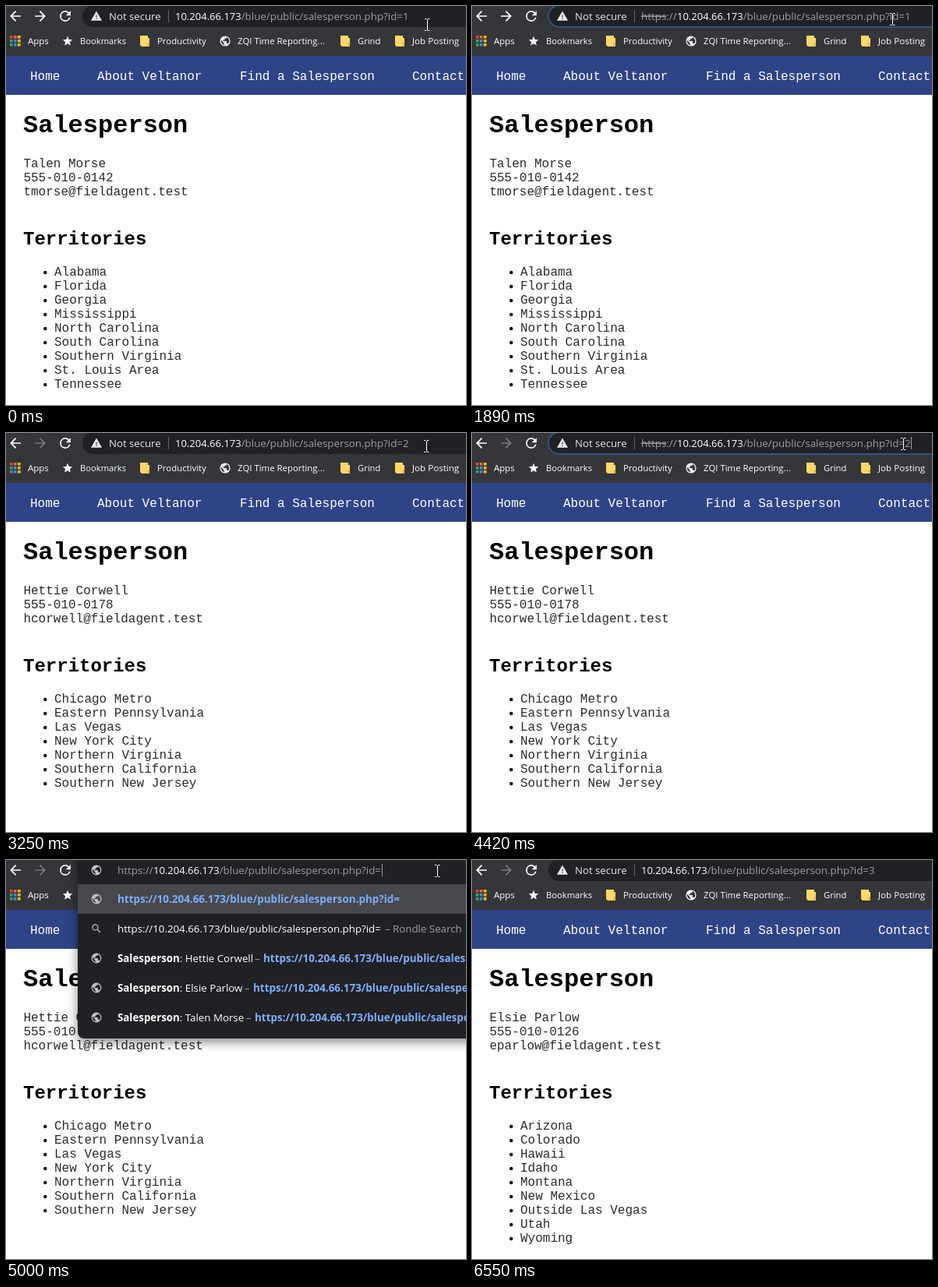
Recreate the animation shown at these times as an HTML page. Size 590 by 512 pixels, loop 7.23 s.

```html
<!DOCTYPE html>
<html lang="en">
<head>
<meta charset="utf-8">
<title>Salesperson pages</title>
<style>
  html, body { margin: 0; width: 100%; height: 100%; overflow: hidden; background: #fff; }
  svg { display: block; width: 590px; height: 512px; }
  .ui { font-family: "Open Sans", "Noto Sans", sans-serif; }
  .page { font-family: "Liberation Mono", "Courier New", monospace; font-size: 16px; fill: #2a2a2a; }
  .page .head { font-weight: 700; fill: #000; }
  .strike { text-decoration: line-through; }
  .drop { filter: drop-shadow(0 4px 7px rgba(0, 0, 0, .5)); }
  text { white-space: pre; }
</style>
</head>
<body>
<svg id="stage" viewBox="0 0 590 512"></svg>
<script>
const LOOP = 7230;
const HOST = "10.204.66.173";
const PATH = "/blue/public/salesperson.php?id=";
const BAR = "#35363a", FIELD = "#202124", WHITE = "#fff", GREY = "#9aa0a6", BLUE = "#7fadf8";

const people = [
  { name: "Talen Morse", phone: "555-010-0142", mail: "tmorse", linkX: 319,
    areas: "Alabama,Florida,Georgia,Mississippi,North Carolina,South Carolina,Southern Virginia,St. Louis Area,Tennessee" },
  { name: "Hettie Corwell", phone: "555-010-0178", mail: "hcorwell", linkX: 330,
    areas: "Chicago Metro,Eastern Pennsylvania,Las Vegas,New York City,Northern Virginia,Southern California,Southern New Jersey" },
  { name: "Elsie Parlow", phone: "555-010-0126", mail: "eparlow", linkX: 317,
    areas: "Arizona,Colorado,Hawaii,Idaho,Montana,New Mexico,Outside Las Vegas,Utah,Wyoming" }
];

// Each step changes part of the state at a given time.
const steps = [
  [0, { page: 0, bar: "idle", id: 1, caret: 0, pointer: "beam", x: 540, y: 24 }],
  [370, { y: 18 }],
  [520, { x: 539, y: 17 }],
  [830, { bar: "selected" }],
  [1360, { bar: "edit", caret: 1 }],
  [1890, { caret: 0 }],
  [2450, { bar: "typing", id: "", caret: 1 }],
  [2570, { id: 2 }],
  [2850, { bar: "loading" }],
  [3130, { bar: "idle", page: 1 }],
  [3780, { x: 553, y: 14 }],
  [4040, { bar: "selected" }],
  [4420, { bar: "edit" }],
  [4850, { bar: "typing", id: "" }],
  [5120, { id: 3 }],
  [5370, { bar: "loading" }],
  [5520, { bar: "idle", page: 2 }],
  [6020, { pointer: "arrow", x: 541, y: 250 }],
  [6140, { x: 525, y: 493 }],
  [6550, { pointer: "none" }]
];

const glyphs = {
  back: "M20 11H7.83l5.59-5.59L12 4l-8 8 8 8 1.41-1.41L7.83 13H20z",
  next: "M4 11h12.17l-5.59-5.59L12 4l8 8-8 8-1.41-1.41L16.17 13H4z",
  reload: "M17.65 6.35A7.96 7.96 0 0 0 12 4a8 8 0 1 0 7.73 10h-2.08A6 6 0 1 1 12 6c1.66 0 3.14.69 4.22 1.78L13 11h7V4z",
  stop: "M19 6.4L17.6 5 12 10.6 6.4 5 5 6.4 10.6 12 5 17.6 6.4 19 12 13.4 17.6 19 19 17.6 13.4 12z",
  warn: "M1 21h22L12 2zM13 18h-2v-2h2zM13 14h-2v-4h2z",
  star: "M12 17.27L18.18 21l-1.64-7.03L22 9.24l-7.19-.61L12 2 9.19 8.63 2 9.24l5.46 4.73L5.82 21z",
  search: "M15.5 14h-.79l-.28-.27A6.47 6.47 0 0 0 16 9.5 6.5 6.5 0 1 0 9.5 16c1.61 0 3.09-.59 4.23-1.57l.27.28v.79l5 4.99L20.49 19zm-6 0a4.5 4.5 0 1 1 0-9 4.5 4.5 0 0 1 0 9z",
  globe: "M12 2a10 10 0 1 0 0 20 10 10 0 0 0 0-20zm-1 17.93c-3.95-.49-7-3.85-7-7.93 0-.62.08-1.21.21-1.79L9 15v1c0 1.1.9 2 2 2zm6.9-2.54c-.26-.81-1-1.39-1.9-1.39h-1v-3c0-.55-.45-1-1-1H8v-2h2c.55 0 1-.45 1-1V7h2c1.1 0 2-.9 2-2v-.41c2.93 1.19 5 4.06 5 7.41 0 2.08-.8 3.97-2.1 5.39z"
};

const rect = (x, y, w, h, fill, more = "") =>
  `<rect x="${x}" y="${y}" width="${w}" height="${h}" fill="${fill}" ${more}/>`;
const text = (x, y, size, fill, str, more = "") =>
  `<text x="${x}" y="${y}" font-size="${size}" fill="${fill}" ${more}>${str}</text>`;
const icon = (name, cx, cy, scale, fill) =>
  `<path d="${glyphs[name]}" fill="${fill}" fill-rule="evenodd" transform="translate(${cx - 12 * scale} ${cy - 12 * scale}) scale(${scale})"/>`;
const bold = 'font-weight="700"';

function folder(x) {
  return `<path d="M${x} 38h10v3h2v11h-10l-2-2z" fill="#ffd868"/>` +
    `<path d="M${x + 9} 47h3v5h-3z" fill="#f2bf45"/>`;
}

function bookmarks() {
  const grid = ["#ea4335", "#f2673a", "#fbbc05", "#34a853", "#4285f4", "#fbbc05", "#34a853", "#4285f4", "#fbbc05"];
  const labels = [[28, 11.5, "Apps"], [95, 11.2, "Bookmarks"], [194, 11.4, "Productivity"],
    [297, 11.4, "ZQI Time Reporting..."], [451, 11.2, "Grind"], [521, 11.6, "Job Posting"]];
  return rect(0, 0, 590, 64, BAR) +
    grid.map((c, i) => rect(5 + i % 3 * 5, 38 + Math.floor(i / 3) * 5, 3.6, 3.6, c)).join("") +
    icon("star", 79, 45, .62, WHITE) + icon("globe", 281, 45, .66, "#f1f3f4") +
    [172, 429, 499].map(folder).join("") +
    labels.map(([x, size, s]) => text(x, 49, size, WHITE, s)).join("");
}

// Address text in its parts: scheme, host, path.
function address(x, id, scheme, opts = {}) {
  const dim = opts.plain || GREY;
  let out = "";
  if (scheme) {
    const word = opts.strike ? '<tspan class="strike">https</tspan>' : "https";
    out += text(x, 18, 13.4, dim, word + "://");
    x += 46;
  }
  return out + text(x, 18, 13, WHITE, HOST) + text(x + 84.7, 18, 13.35, dim, PATH + id);
}

const caretAt = x => rect(x, 5, 1, 16, GREY);

function suggestion(cy, p, id) {
  const y = cy + 5;
  return icon("globe", 116, cy, .64, "#bdc1c6") +
    text(143, y, 13.3, WHITE, `<tspan ${bold}>Salesperson</tspan>: ${p.name}`) +
    text(p.linkX - 11, y, 13.3, GREY, "–") +
    text(p.linkX, y, 13.45, BLUE, "https://" + HOST + PATH + id, bold);
}

function dropdown(id) {
  const full = id === "", bottom = full ? 229 : 115;
  const url = "https://" + HOST + PATH + id;
  const end = full ? 481 : 488;
  let out = rect(92, -20, 520, bottom + 20, FIELD, 'rx="8" class="drop"') + rect(92, 31, 498, 38, "#47484b");
  if (full) {
    out += icon("globe", 116, 50, .64, "#bdc1c6") + text(143, 55, 13.45, BLUE, url, bold) +
      [1, 2, 0].map((n, i) => suggestion(126 + 38 * i, people[n], n + 1)).join("");
  } else {
    out += suggestion(50, people[id - 1], id);
  }
  return out + icon("search", 116, 88, .64, "#bdc1c6") +
    text(143, 93, 13.28, WHITE, url) + text(end + 5, 93, 13.3, GREY, "–") +
    text(end + 15, 93, 13.3, GREY, "Rondle Search");
}

function toolbar(s) {
  const focused = s.bar === "selected" || s.bar === "edit";
  let out = icon("back", 12, 13, .86, WHITE) +
    icon("next", 44, 13, .86, s.page === 0 ? WHITE : "#77787b") +
    icon(s.bar === "loading" ? "stop" : "reload", 76, 13, .86, WHITE);
  if (s.bar === "typing") {
    out += dropdown(s.id) + icon("globe", 116, 13, .64, "#c4c7cb") + address(143, s.id, true);
    return out + (s.caret ? caretAt(s.id === "" ? 482 : 489) : "");
  }
  out += rect(98, -1, 520, 28, FIELD, 'rx="14"' + (focused ? ' stroke="#34527f" stroke-width="2"' : ""));
  if (s.bar === "loading")
    return out + icon("globe", 116, 13, .64, "#c4c7cb") + address(143, s.id, false);
  out += icon("warn", 116, 13, .64, "#e8eaed") + text(132, 18, 13.2, "#e8eaed", "Not secure") +
    rect(208, 5, 1, 16, "#5f6368");
  if (s.bar === "selected")
    return out + rect(217, 2, 346, 22, "#185abc") + address(217, s.id, true, { strike: true, plain: WHITE });
  out += address(217, s.id, focused, { strike: focused });
  return out + (focused && s.caret ? caretAt(563) : "");
}

function page(p) {
  const nav = [[31, "Home"], [117, "About Veltanor"], [300, "Find a Salesperson"], [521, "Contact"]];
  const lines = [p.name, p.phone, p.mail + "@fieldagent.test"];
  const line = (x, y, s) => `<text x="${x}" y="${y}">${s}</text>`;
  return rect(0, 0, 590, 512, "#fff") + rect(0, 64, 590, 50, "#2f4487") +
    nav.map(([x, s]) => text(x, 95, 16, WHITE, s)).join("") +
    `<text class="head" x="22" y="162" font-size="32">Salesperson</text>` +
    lines.map((s, i) => line(22.4, 207 + 18 * i, s)).join("") +
    `<text class="head" x="22" y="306" font-size="24">Territories</text>` +
    p.areas.split(",").map((s, i) =>
      `<circle cx="50.3" cy="${342 + 18 * i}" r="2.2" fill="#000"/>` + line(62, 346 + 18 * i, s)).join("");
}

function pointer({ pointer, x, y }) {
  if (pointer === "beam")
    return `<path d="M${x - 3} ${y - 7.5}h2.5M${x + 1} ${y - 7.5}h2.5M${x + .5} ${y - 7}v14M${x - 3} ${y + 7.5}h2.5M${x + 1} ${y + 7.5}h2.5" stroke="#fff" fill="none"/>`;
  if (pointer === "arrow")
    return `<path d="M${x + .5} ${y + .5}v16l3.7-3.5 2.6 5.6 2.2-1-2.5-5.4h5z" fill="#fff" stroke="#000"/>`;
  return "";
}

const stage = document.getElementById("stage");
let shown = -1;

function draw(time) {
  const at = steps.filter(([ms]) => ms <= time).length;
  if (at === shown) return;
  shown = at;
  const s = Object.assign({}, ...steps.slice(0, at).map(step => step[1]));
  stage.innerHTML = `<g class="page">${page(people[s.page])}</g>` +
    `<g class="ui">${bookmarks()}${toolbar(s)}</g>` + pointer(s);
}

const start = performance.now();
function tick() {
  draw((performance.now() - start) % LOOP);
  requestAnimationFrame(tick);
}
tick();
</script>
</body>
</html>
```
